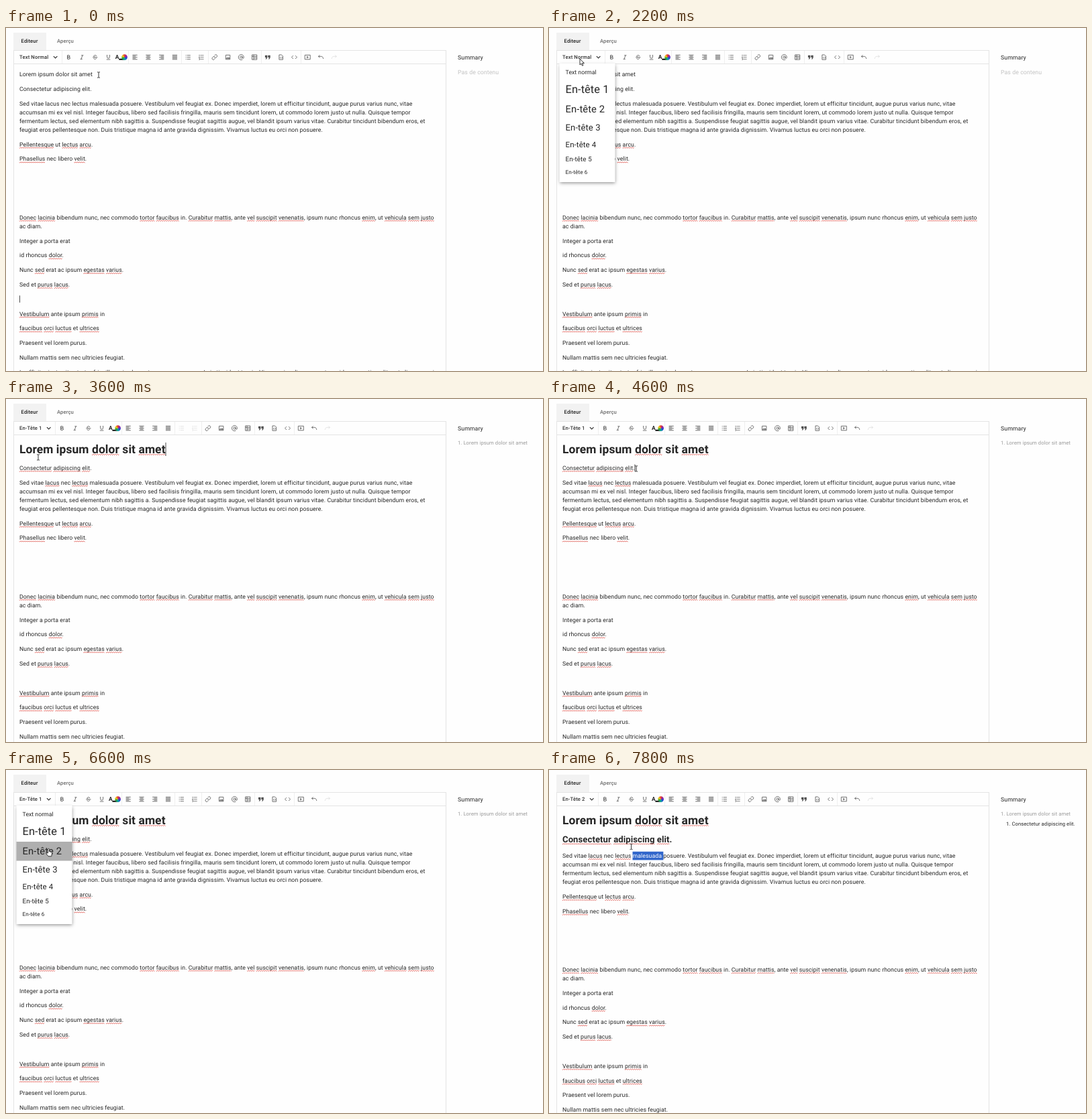
Recreate the animation shown at these times as an HTML page with a canvas. Size 800 by 512 pixels, loop 8 s.

```html
<!DOCTYPE html>
<html lang="fr">
<head>
<meta charset="utf-8">
<title>Editeur</title>
<style>
html, body { margin: 0; width: 100%; height: 100%; overflow: hidden; background: #fefefe; }
canvas { display: block; width: 800px; height: 512px; }
</style>
</head>
<body>
<canvas id="stage" width="800" height="512"></canvas>
<script>
const ctx = document.getElementById('stage').getContext('2d');
const LOOP = 8000, STEP = 200;
const UNIT = 0.545;                 // page zoom
const BODY = 16 * UNIT, SMALL = 14 * UNIT, ROW = 40 * UNIT, LINE = 24 * UNIT;
const INK = '#262626', ICON = '#505050', EDGE = '#e4e4e4';

// Words between underscores carry a spelling mark.
const title = 'Lorem ipsum _dolor_ sit _amet_';
const subtitle = '_Consectetur_ _adipiscing_ _elit_.';
const intro = [
  'Sed vitae _lacus_ nec _lectus_ malesuada posuere. Vestibulum vel feugiat ex. Donec imperdiet, lorem ut efficitur tincidunt, augue purus varius nunc, vitae',
  'accumsan mi ex vel nisl. Integer faucibus, libero sed facilisis fringilla, mauris sem tincidunt lorem, ut commodo lorem justo ut nulla. Quisque tempor',
  'fermentum lectus, sed elementum nibh sagittis a. Suspendisse feugiat sagittis augue, vel blandit ipsum varius vitae. Curabitur tincidunt bibendum eros, et',
  'feugiat eros pellentesque non. Duis tristique magna id ante gravida dignissim. Vivamus luctus eu orci non posuere.'
];
const rest = [
  ['_Pellentesque_ ut _lectus_ _arcu_.'],
  ['_Phasellus_ nec libero _velit_.'],
  [''], [''], [''],
  ['_Donec_ _lacinia_ bibendum nunc, nec commodo _tortor_ _faucibus_ in. _Curabitur_ _mattis_, ante _vel_ _suscipit_ _venenatis_, ipsum nunc rhoncus _enim_, ut _vehicula_ _sem_ _justo_',
   'ac diam.'],
  ['Integer a porta erat'],
  ['id rhoncus _dolor_.'],
  ['Nunc _sed_ erat ac ipsum _egestas_ _varius_.'],
  ['Sed et _purus_ _lacus_.'],
  [''],
  ['_Vestibulum_ ante ipsum _primis_ in'],
  ['_faucibus_ _orci_ _luctus_ et _ultrices_'],
  ['Praesent vel lorem purus.'],
  ['Nullam mattis sem nec ultricies feugiat.'],
  ['In efficitur justo vitae tortor fringilla, quis elementum sem accumsan. In in tincidunt turpis. Vivamus iaculis, augue ut gravida venenatis, velit erat aliquam orci']
];

// Each entry changes part of the state; the rest carries over.
const steps = [
  [0, { cursor: 'beam', x: 138, y: 70, caret: 'blank', level: 0, menu: 0, ripple: 0, lists: true, select: false }],
  [200, { caret: 'title' }],
  [800, { caret: '' }],
  [1400, { x: 100, y: 66 }],
  [1600, { cursor: 'arrow', x: 45.5, y: 54.5 }],
  [1800, { x: 46, y: 46 }],
  [2000, { menu: 0.55 }],
  [2200, { menu: 1 }],
  [2400, { cursor: 'hand', y: 59 }],
  [2600, { y: 68 }],
  [2800, { y: 85 }],
  [3000, { ripple: 17 }],
  [3200, { ripple: 100 }],
  [3400, { level: 1, menu: 0.45, ripple: 0, lists: false, caret: 'title', cursor: 'beam', x: 48, y: 87 }],
  [3600, { menu: 0 }],
  [3800, { x: 62, y: 91 }],
  [4000, { x: 100, y: 99, caret: '' }],
  [4200, { x: 130, y: 104 }],
  [4400, { caret: 'subtitle', lists: true }],
  [4800, { caret: '' }],
  [5000, { x: 104, y: 84 }],
  [5200, { cursor: 'arrow', x: 62, y: 52 }],
  [5400, { x: 56, y: 50.5, menu: 0.55 }],
  [5600, { menu: 1 }],
  [5800, { cursor: 'hand', x: 60, y: 80 }],
  [6000, { x: 62, y: 104 }],
  [6200, { x: 63.5, y: 117.5 }],
  [6400, { ripple: 17 }],
  [6600, { ripple: 100 }],
  [6800, { level: 2, menu: 0.45, ripple: 0, caret: 'subtitle', cursor: 'beam', x: 64, y: 122 }],
  [7000, { menu: 0 }],
  [7400, { x: 106, y: 125, caret: '' }],
  [7600, { x: 138, y: 127, select: true }],
  [7800, { x: 122.5, y: 114.5 }]
];

function stateAt(t) {
  return Object.assign({}, ...steps.filter(s => s[0] <= t).map(s => s[1]));
}

function setFont(size, weight = 400, spacing = 0.15 * UNIT) {
  ctx.font = `${weight} ${size}px Roboto, sans-serif`;
  ctx.letterSpacing = spacing + 'px';
}

function label(str, x, y, size, color = INK, weight = 400, spacing) {
  setFont(size, weight, spacing);
  ctx.fillStyle = color;
  ctx.fillText(str, x, y);
}

function squiggle(x, y, w) {
  ctx.beginPath();
  for (let i = 0; i <= w; i += 0.5) ctx.lineTo(x + i, y + 0.65 * Math.sin(i * 2.1));
  ctx.strokeStyle = '#dc4038';
  ctx.lineWidth = 0.8;
  ctx.stroke();
}

// Draws a line with its spelling marks and returns its right end.
function marked(str, x, y, size = BODY, weight = 400, marks = true) {
  const parts = str.split('_');
  label(parts.join(''), x, y, size, INK, weight);
  let before = '';
  parts.forEach((part, i) => {
    const start = x + ctx.measureText(before).width;
    before += part;
    if (marks && i % 2) squiggle(start, y + 2.1, x + ctx.measureText(before).width - start);
  });
  return x + ctx.measureText(before).width;
}

const icons = [
  { d: 'M8 5h5a3.2 3.2 0 0 1 0 6.6H8zM8 11.6h6a3.2 3.2 0 0 1 0 6.9H8z', w: 2.5 },
  { d: 'M10 5h8M6 19h8M14.5 5 9.5 19' },
  { d: 'M3 12.5h18M17 8c0-4.5-10-4.5-10 0 0 2 2 3 5 4M16.5 14.5c1.5 5.5-9.5 6-10 1' },
  { d: 'M7 3v8a5 5 0 0 0 10 0V3M5 20.5h14' },
  { wheel: true },
  { d: 'M3 4h18M3 8h12M3 12h18M3 16h12M3 20h18' },
  { d: 'M3 4h18M6 8h12M3 12h18M6 16h12M3 20h18' },
  { d: 'M3 4h18M9 8h12M3 12h18M9 16h12M3 20h18' },
  { d: 'M3 4h18M3 8h18M3 12h18M3 16h18M3 20h18' },
  { d: 'M8 5h13M8 12h13M8 19h13M3 5h2.5M3 12h2.5M3 19h2.5', list: true },
  { d: 'M8 5h13M8 12h13M8 19h13M4.5 2.5v5M3 10.5h2.5L3 14h3M3 17h3v4.5H3', list: true, w: 1.7 },
  { d: 'M10 13a5 5 0 0 0 7.5.5l3-3a5 5 0 0 0-7-7l-1.7 1.7M14 11a5 5 0 0 0-7.5-.5l-3 3a5 5 0 0 0 7 7l1.7-1.7' },
  { d: 'M4 4h16v16H4zM6.5 17l4-5 3 3 2-2.500 3 4.500z' },
  { d: 'M16 12a4 4 0 1 0-8 0 4 4 0 0 0 8 0zM16 8v5a3 3 0 0 0 6 0v-1a10 10 0 1 0-5 8.700' },
  { d: 'M3 3h18v18H3zM3 9h18M9 3v18M9 15h12' },
  { d: 'M2 5h8.500v8l-3 6H4l2-6H2zM13 5h8.500v8l-3 6H15l2-6h-4z', solid: true },
  { d: 'M5 3h9l5 5v13H5zM11 11l-2.500 3 2.500 3M14 11l2.500 3-2.500 3' },
  { d: 'M8 6l-6 6 6 6M16 6l6 6-6 6' },
  { d: 'M2 4h20v16H2zM10 9v6l5-3z' },
  { d: 'M8 4 3 9l5 5M3 9h10c5 0 8 4 8 9' },
  { d: 'M16 4l5 5-5 5M21 9H11c-5 0-8 4-8 9', off: true }
].map(icon => ({ ...icon, path: new Path2D(icon.d || '') }));

function colorWheel(x) {
  label('A', x - 9.5, 46, 8.4, '#222', 700, 0);
  ctx.fillStyle = '#000';
  ctx.fillRect(x - 4, 45.8, 8, 1.9);
  const hues = ctx.createConicGradient(-Math.PI / 2, x + 4.2, 43.6);
  ['#e53935', '#8e24aa', '#2448d8', '#12a8a0', '#2e9e35', '#f4d21c', '#e53935']
    .forEach((c, i) => hues.addColorStop(i / 6, c));
  ctx.fillStyle = hues;
  ctx.beginPath();
  ctx.arc(x + 4.2, 43.6, 4.4, 0, 7);
  ctx.fill();
}

function drawIcon(icon, x, lists) {
  if (icon.wheel) return colorWheel(x);
  ctx.save();
  ctx.translate(x, 43.6);
  ctx.scale(0.4, 0.4);
  ctx.translate(-12, -12);
  ctx.strokeStyle = ctx.fillStyle = icon.off || (icon.list && !lists) ? '#dedede' : ICON;
  ctx.lineWidth = icon.w || 2;
  if (icon.solid) ctx.fill(icon.path); else ctx.stroke(icon.path);
  ctx.restore();
}

function toolbar(s) {
  const shift = s.level ? -9.9 : 0;
  label(s.level ? 'En-Tête ' + s.level : 'Text Normal', 20, 46.2, SMALL, '#333', 500, 0.136);
  ctx.strokeStyle = '#333';
  ctx.lineWidth = 1.2;
  ctx.beginPath();
  ctx.moveTo(70.8 + shift, 42.2);
  ctx.lineTo(73.6 + shift, 45);
  ctx.lineTo(76.4 + shift, 42.2);
  ctx.stroke();
  icons.forEach((icon, i) => drawIcon(icon, 93.2 + shift + i * 19.78, s.lists));
  ctx.fillStyle = '#efefef';
  [0, 5, 9, 11, 15, 18].forEach(i => ctx.fillRect(Math.round(83.3 + shift + i * 19.78), 34, 1, 19));
}

function page() {
  ctx.fillStyle = '#fefefe';
  ctx.fillRect(0, 0, 800, 512);
  ctx.fillStyle = '#f2f2f2';
  ctx.fillRect(11, 7, 49, 26.5);
  label('Editeur', 22.5, 22.4, SMALL, '#222', 500, 0.136);
  label('Aperçu', 76, 22.4, SMALL, '#6c6c6c', 500, 0.136);
  ctx.fillStyle = EDGE;
  ctx.fillRect(11, 33, 645, 1);
  ctx.fillRect(11, 53, 645, 1);
  ctx.fillRect(11, 33, 1, 479);
  ctx.fillRect(655, 33, 1, 479);
}

function caret(x, middle, height) {
  ctx.fillStyle = '#222';
  ctx.fillRect(x, middle - height / 2, 0.8, height);
}

function selection(y) {
  const line = intro[0].replaceAll('_', ''), word = 'malesuada ';
  setFont(BODY);
  const x = 20 + ctx.measureText(line.split(word)[0]).width;
  ctx.fillStyle = '#3166cb';
  ctx.fillRect(x, y - 9.1, ctx.measureText(word).width, 12.6);
  label(word, x, y, BODY, '#fff');
}

function editor(s) {
  const shift = [0, 12, 15.3][s.level], big = s.level > 0, sub = s.level > 1;
  const titleEnd = big ? marked(title, 20, 80.9, 2 * BODY, 700)
                       : marked(title, 20, 72, BODY, 400, false);
  const subEnd = sub ? marked(subtitle, 20, 108.2, 1.5 * BODY, 700)
                     : marked(subtitle, 20, 93.8 + shift, BODY, 400, big);
  const top = 72 + 2 * ROW + shift;
  intro.forEach((line, i) => marked(line, 20, top + i * LINE, BODY, 400, big));
  if (s.select) selection(top);

  let y = top + 3 * LINE + ROW;
  for (const lines of rest) {
    lines.forEach((line, i) => marked(line, 20, y + i * LINE, BODY));
    y += ROW + (lines.length - 1) * LINE;
  }
  if (s.caret === 'blank') caret(20, 404.6, 10.5);
  if (s.caret === 'title') big ? caret(titleEnd, 75, 20) : caret(titleEnd, 69, 10.5);
  if (s.caret === 'subtitle') sub ? caret(subEnd, 103.7, 15) : caret(subEnd, 102.8, 10.5);
}

function summary(s) {
  label('Summary', 673, 47, BODY);
  if (!s.level) label('Pas de contenu', 673, 68.6, BODY, '#c2c2c2');
  else label('1. ' + title.replaceAll('_', ''), 673, 67.7, SMALL, '#9a9a9a');
  if (s.level > 1) label('1. ' + subtitle.replaceAll('_', ''), 681, 83.3, SMALL);
}

const rowEdges = [56, 75, 107, 135.5, 162, 185.5, 206, 226];
const rowMiddles = [65.5, 91.5, 121, 148.5, 174, 195.5, 215.5];

function menu(s) {
  if (!s.menu) return;
  const x = 15.5, w = 83;
  ctx.save();
  ctx.globalAlpha = s.menu;
  ctx.save();
  ctx.shadowColor = 'rgba(0,0,0,0.42)';
  ctx.shadowBlur = 5;
  ctx.shadowOffsetY = 1.5;
  ctx.fillStyle = '#fff';
  ctx.fillRect(x, 53, w, 177);
  ctx.restore();

  const row = rowEdges.findLastIndex(edge => edge <= s.y);
  if (s.cursor === 'hand' && row >= 0 && row < 7) {
    ctx.save();
    ctx.beginPath();
    ctx.rect(x, rowEdges[row], w, rowEdges[row + 1] - rowEdges[row]);
    ctx.clip();
    ctx.fillStyle = 'rgba(0,0,0,0.06)';
    ctx.fillRect(x, 53, w, 177);
    ctx.fillStyle = s.ripple > 50 ? 'rgba(0,0,0,0.27)' : 'rgba(0,0,0,0.16)';
    ctx.beginPath();
    ctx.arc(s.x, s.y + 1, s.ripple, 0, 7);
    ctx.fill();
    ctx.restore();
  }
  rowMiddles.forEach((middle, i) => {
    const size = (i ? 33 - 3 * i : 16) * UNIT;
    label(i ? 'En-tête ' + i : 'Text normal', 24.6, middle + 0.356 * size, size, INK, 400, i ? 0.08 : 0);
  });
  ctx.restore();
}

const shapes = {
  arrow: new Path2D('M0 0v9l2-1.900 1.500 3.200 1.500-.700-1.500-3.100h2.900z'),
  hand: new Path2D('M-1 6.500V.8a1 1 0 0 1 2 0v3.400l3 .7q1.200.4 1 1.700l-.7 4.700h-4.800l-3.200-4q-.2-1.500 1.200-1z'),
  beam: new Path2D('M-2-4.200q1.500 0 2 .6.500-.6 2-.6M0-3.600v7.200M-2 4.200q1.500 0 2-.6.500.6 2 .6')
};

function pointer(s) {
  ctx.save();
  ctx.translate(s.x, s.y);
  ctx.strokeStyle = '#222';
  ctx.fillStyle = '#fff';
  ctx.lineWidth = 0.9;
  if (s.cursor !== 'beam') ctx.fill(shapes[s.cursor]);
  ctx.stroke(shapes[s.cursor]);
  ctx.restore();
}

function draw(now) {
  const t = Math.floor((now % LOOP) / STEP) * STEP;
  const s = stateAt(t);
  ctx.textRendering = 'geometricPrecision';
  page();
  toolbar(s);
  editor(s);
  summary(s);
  menu(s);
  pointer(s);
}

let start;
function tick(now) {
  start ??= now;
  draw(now - start);
  requestAnimationFrame(tick);
}
draw(0);
requestAnimationFrame(tick);
</script>
</body>
</html>
```
